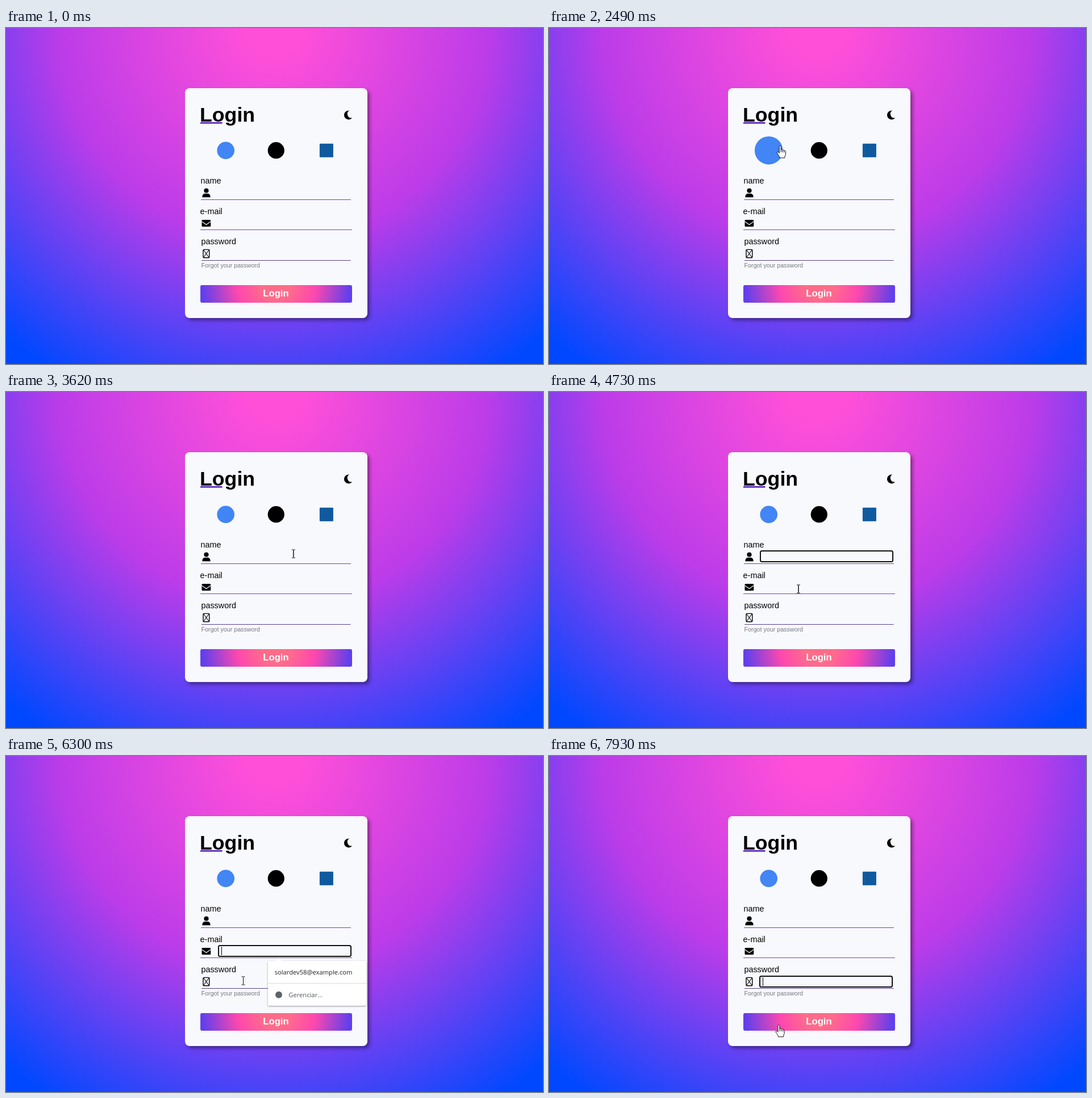
These frames come from a looping animation (945x592 px, 8000 ms). An HTML page:

```html
<!DOCTYPE html>
<html lang="en">
<head>
<meta charset="utf-8">
<title>Login form</title>
<style>
html, body { margin: 0; width: 100%; height: 100%; overflow: hidden; }
body { background: radial-gradient(circle at 472px 0, #ff4fd9 50px, #bb3ce9 380px, #0048ff 720px); }
svg { position: absolute; left: 0; top: 0; }
text { font-family: "Liberation Sans", Arial, sans-serif; }
.label { font-size: 14.4px; }
.title { font-size: 35.7px; font-weight: bold; }
.popup text { font-family: "Open Sans", sans-serif; font-size: 11.2px; fill: #202124; }
.popup .more { fill: #54575c; }
.card, .button, .popup-box { position: absolute; }
.card { left: 315px; top: 106px; width: 321px; height: 405px; border-radius: 8px;
  background: #f8f9fd; box-shadow: 4px 4px 6px rgba(0, 0, 0, .4); }
.button { left: 342px; top: 453px; width: 267px; height: 31px; border-radius: 3px;
  background: radial-gradient(circle at 50% 0, #ff6c8b 25px, #ff48ae 68px, #613fec 130px); }
.popup-box { left: 461px; top: 361px; width: 173px; height: 79px; border-radius: 2px;
  background: #fff; box-shadow: 0 1px 3px rgba(0, 0, 0, .4); }
</style>
</head>
<body>
<div class="card"></div>
<div class="button"></div>
<svg width="945" height="592">
  <text class="title" x="341" y="165">Login</text>
  <path d="M342 167.2H380.5" stroke="#4a18b4" stroke-width="2.4"/>
  <path d="M604 145.6A7.9 7.9 0 1 0 609 158.4A7 7 0 0 1 604 145.6Z"/>

  <circle class="icon" r="15.3" fill="#4285f4"/>
  <circle class="icon" r="14.6"/>
  <rect class="icon" x="-12" y="-12" width="24" height="24" rx="1" fill="#0f5a9f"/>

  <text class="label" x="342.6" y="274">name</text>
  <text class="label" x="341.6" y="327.7">e-mail</text>
  <text class="label" x="343.4" y="381.3">password</text>
  <path d="M343 302.5H607" stroke="#7c2ff0"/>
  <path d="M342 355.5H609" stroke="#7340dc"/>
  <path d="M344 409.5H606.5" stroke="#56418f"/>

  <circle cx="352.5" cy="286.5" r="4.1"/>
  <path d="M345.4 298.2C345.2 294 347.5 291.8 350 291.8H355C357.6 291.8 359.8 294 359.6 298.2Z"/>
  <rect x="344.5" y="338" width="15.8" height="12" rx="1.6"/>
  <path d="M344.5 341L352.4 346.4L360.3 341" fill="none" stroke="#f8f9fd" stroke-width="1.2"/>
  <g fill="none" stroke="#000" stroke-width="1.4">
    <rect x="347" y="390.4" width="10.8" height="14.4" rx="1.4"/>
    <path d="M347.6 391L357.2 404.2M357.2 391L347.6 404.2" stroke-width="1.1"/>
  </g>
  <text x="343.6" y="422.3" font-size="10.7" fill="#777a80">Forgot your password</text>
  <text x="475" y="473" font-size="16.7" font-weight="bold" fill="#fff" text-anchor="middle">Login</text>

  <g id="focus">
    <rect x="1" y="1" width="233" height="19" rx="2.5" fill="none" stroke="#101014" stroke-width="2"/>
    <path id="caret" d="M6.5 3V18" stroke="#000"/>
  </g>
</svg>
<div id="popup" class="popup">
  <div class="popup-box"></div>
  <svg width="945" height="592">
    <path d="M474 361.5L480 355.5L486 361.5Z" fill="#fff"/>
    <path d="M461 400.5H634" stroke="#dadce0"/>
    <text x="472.7" y="384.7">solardev58@example.com</text>
    <circle cx="480" cy="420.7" r="6" fill="#5f6368"/>
    <text class="more" x="497.3" y="425">Gerenciar...</text>
  </svg>
</div>
<svg width="945" height="592">
  <g id="pointer" stroke="#111" fill="#fff" stroke-linejoin="round">
    <path id="arrow" d="M.5 .5V14.6L3.7 11.7L6 16.8L8.2 15.8L6 10.9H10.2Z"/>
    <path id="hand" d="M-1.6 1.2C-1.6 -.8 1.4 -.8 1.4 1.2V6.6C2.2 5.6 4 6 4.2 7.2C5 6.4 6.8 6.8 7 8.2C8 7.6 9.6 8 9.6 9.8V14C9.6 16 8 17.2 8 20.8H-1C-1.2 17.6 -3.8 15.4 -5.4 12.2C-6.2 10.4 -3.8 9.6 -2.8 11L-1.6 12.4ZM1.4 6.6V11M4.2 7.2V11M7 8.2V11.4"/>
    <path id="beam" fill="none" d="M-3 -7.2H-1Q0 -7.2 0 -6V6Q0 7.2 -1 7.2H-3M3 -7.2H1Q0 -7.2 0 -6V6Q0 7.2 1 7.2H3"/>
  </g>
</svg>
<script>
const LOOP = 8000, BLINK = 530, ENTER = 1030;
const ICON_X = 386.7, ICON_STEP = 88.6, ICON_Y = 215.7;
const ROW_Y = 279.3, ROW_STEP = 53.6;
const $ = id => document.getElementById(id);
const icons = [...document.querySelectorAll(".icon")];

// start, end, x, y: each move goes on from the last place
const moves = [
  [ENTER, ENTER, 898, 568],
  [ENTER, 1400, 420, 264],
  [1400, 1600, 287, 327],
  [1600, 1810, 258, 369],
  [1880, 2160, 396, 218],
  [2360, 2490, 406.5, 208],
  [2490, 2770, 497, 214],
  [2990, 3270, 566, 212],
  [3400, 3620, 506, 285],
  [3620, 3760, 490, 290],
  [4240, 4730, 439, 347],
  [5130, 5550, 418, 417],
  [5960, 6300, 417.5, 396],
  [6620, 7130, 396, 444],
  [7390, 7600, 397, 475],
  [7860, 7930, 404.5, 474]
];

// field focus: start time and left edge, one per row
const focusAt = [3890, 4930, 6500], focusX = [371, 373, 370];

const clamp = v => Math.min(1, Math.max(0, v));
const ease = v => (v = clamp(v), v * v * (3 - 2 * v));
const inside = (x, y, l, t, w, h) => x >= l && x <= l + w && y >= t && y <= t + h;
const rowTop = i => Math.round(ROW_Y + ROW_STEP * i);
const iconX = i => ICON_X + ICON_STEP * i;
const show = (el, on) => el.style.display = on ? "" : "none";

function pointerAt(t) {
  let [, , x, y] = moves[0];
  for (const [start, end, toX, toY] of moves) {
    if (t < end) {
      const f = clamp((t - start) / (end - start));
      return [x + (toX - x) * f, y + (toY - y) * f];
    }
    [x, y] = [toX, toY];
  }
  return [x, y];
}

// 0 away from an icon, 1 on it
const hover = (i, x, y) => ease((31 - Math.hypot(x - iconX(i), y - ICON_Y)) / 8);

function pointerKind(x, y) {
  const link = icons.some((_, i) => hover(i, x, y) > .5) ||
    inside(x, y, 342, 453, 267, 31) || inside(x, y, 344, 412, 104, 12);
  if (link) return "hand";
  return focusX.some((left, i) => inside(x, y, left, rowTop(i), 235, 21)) ? "beam" : "arrow";
}

function draw(t) {
  const [x, y] = pointerAt(t), here = t >= ENTER;
  icons.forEach((el, i) => {
    const size = 1 + (here ? .62 * hover(i, x, y) : 0);
    el.setAttribute("transform", `translate(${iconX(i)} ${ICON_Y}) scale(${size})`);
  });

  const row = focusAt.filter(start => t >= start).length - 1;
  show($("focus"), row >= 0);
  show($("popup"), row === 1);
  if (row >= 0) {
    $("focus").setAttribute("transform", `translate(${focusX[row]} ${rowTop(row)})`);
    show($("caret"), Math.floor((t - focusAt[row]) / BLINK) % 2 === 0);
  }

  const kind = pointerKind(x, y);
  show($("pointer"), here);
  $("pointer").setAttribute("transform", `translate(${x} ${y})`);
  for (const id of ["arrow", "hand", "beam"]) show($(id), id === kind);
}

function tick() {
  draw(performance.now() % LOOP);
  requestAnimationFrame(tick);
}
tick();
</script>
</body>
</html>
```
